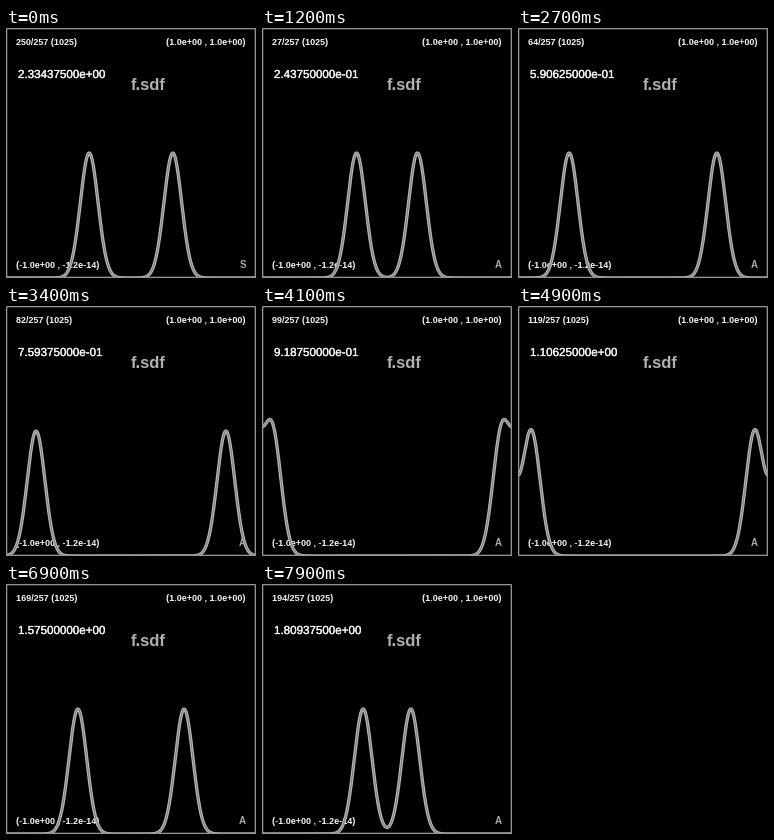
A matplotlib script for the animation above (8 s loop, 250x250 px).

```python
import numpy as np
import matplotlib.pyplot as plt
from matplotlib.animation import FuncAnimation
from matplotlib.patches import Rectangle
from matplotlib.patheffects import withStroke

SIZE, DPI = 250, 100
PX = 72 / DPI            # points per pixel
FRAMES, INTERVAL = 80, 100
STEPS, DT = 257, 0.009375
WIDTH = 0.1              # pulse width, domain is [-1, 1]

plt.rcParams["font.family"] = "Liberation Sans"

fig = plt.figure(figsize=(SIZE / DPI, SIZE / DPI), dpi=DPI, facecolor="black")
ax = fig.add_axes([0, 0, 1, 1])
ax.set(xlim=(0, SIZE), ylim=(SIZE, 0))
ax.axis("off")


def label(x, y, s, size, color="#f4f4f4", weight="bold", ha="left"):
    return ax.text(x, y, s, fontsize=size * PX, color=color, weight=weight,
                   ha=ha, va="baseline", zorder=2)


def step_at(i):
    """Simulation step on show: a stopped view first, then 2.5 steps per tick."""
    return 250 if i == 0 else max(1, 5 * i // 2 - 3)


def wave(x, t):
    """Two travelling Gaussians, reflected at both walls by image sources."""
    u = np.zeros_like(x)
    for m in range(-2, 3):
        for c in (2 * m - t, 2 * m + t):
            u += 0.5 * np.exp(-((x - c) / WIDTH) ** 2)
    return u


x = np.linspace(-1, 1, 1025)
xpix = (x + 1) * SIZE / 2

counter = label(9.5, 17, "", 9)
label(240, 17, "(1.0e+00 , 1.0e+00)", 9, ha="right")
clock = label(12, 50, "", 11.6, weight="normal")
clock.set_path_effects([withStroke(linewidth=0.3 * PX, foreground="#f4f4f4")])
label(125, 62, "f.sdf", 16.6, color="#b0b0b0")
label(9.5, 240, "(-1.0e+00 , -1.2e-14)", 9)
mode = label(236.5, 240.5, "", 9.8, color="#a8a8a8", ha="center")

# A pale line with a darker core
outer, = ax.plot([], [], color="#b8b8b8", lw=3.3 * PX, zorder=3)
inner, = ax.plot([], [], color="#7c7c7c", lw=1.0 * PX, zorder=4)

ax.add_patch(Rectangle((0.65, 0.65), SIZE - 1.3, SIZE - 1.3, fill=False,
                       ec="#959595", lw=1.3 * PX, snap=False, zorder=5))


def draw(i):
    k = step_at(i)
    t = (k - 1) * DT
    y = SIZE * (1 - wave(x, t))
    for line in (outer, inner):
        line.set_data(xpix, y)
    counter.set_text(f"{k}/{STEPS} (1025)")
    clock.set_text(f"{t:.8e}")
    mode.set_text("S" if i == 0 else "A")
    return outer, inner, counter, clock, mode


anim = FuncAnimation(fig, draw, frames=FRAMES, interval=INTERVAL,
                     init_func=lambda: draw(0), repeat=True, repeat_delay=0)
plt.show()
```
